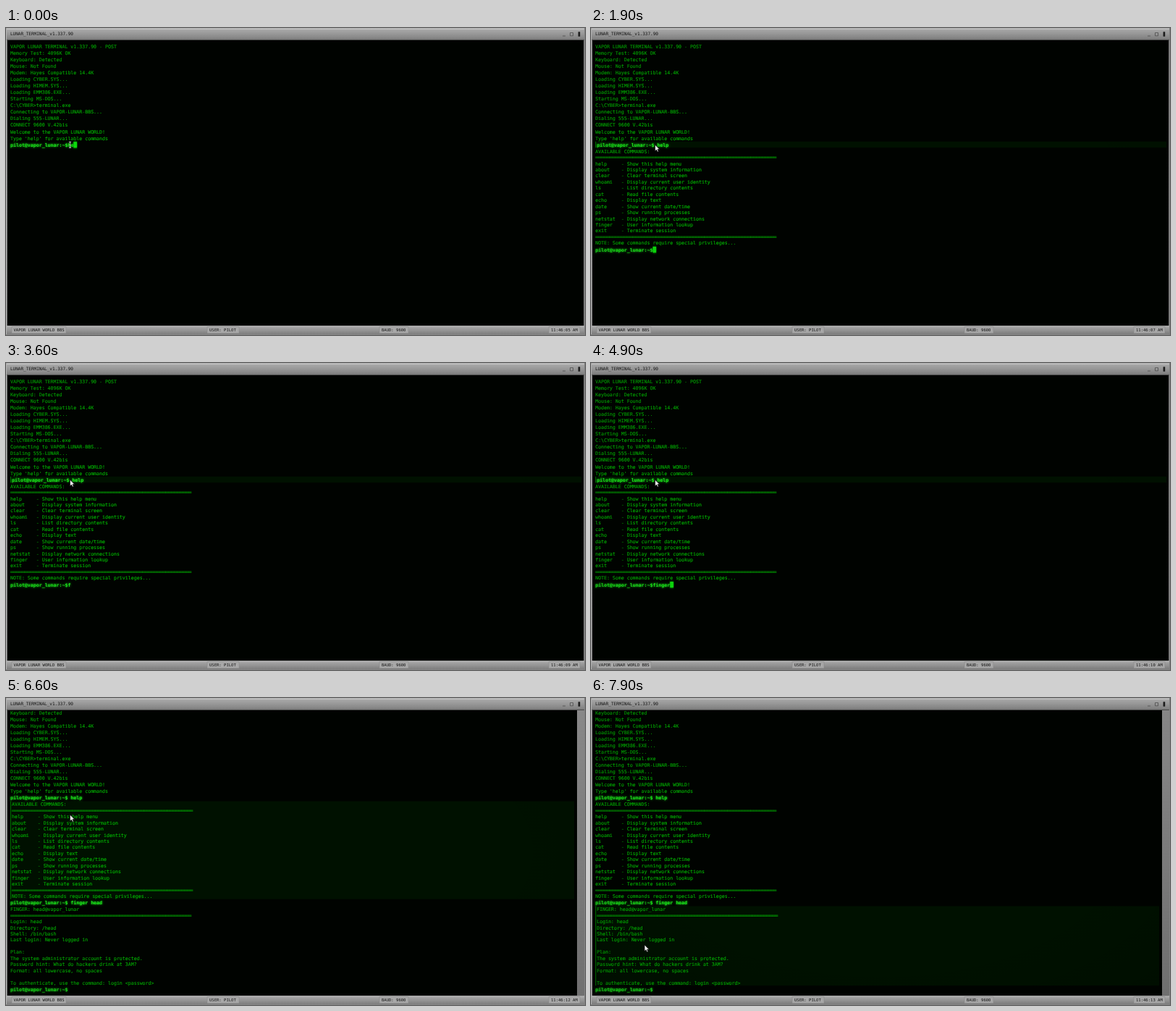
These frames come from a looping animation (800 px wide and 424 px high, 8000 ms). An HTML page:

```html
<!DOCTYPE html>
<html lang="en">
<head>
<meta charset="utf-8">
<title>Terminal</title>
<style>
  html, body { margin: 0; width: 100%; height: 100%; overflow: hidden; background: #000; }
  svg { display: block; width: 100vw; height: 100vh; }
  text { font-family: "DejaVu Sans Mono", "Liberation Mono", monospace; white-space: pre; }
  #screen text { font-size: 6.6px; fill: #00c400; stroke: #00c400; stroke-width: .12; }
  #screen text.bright { font-weight: bold; fill: #1cff1c; stroke: none; filter: url(#glow); }
  #bars text { fill: #161616; font-size: 5.55px; }
  #bars text.title { font-size: 6.03px; }
</style>
</head>
<body>
<svg id="stage" viewBox="0 0 800 424" preserveAspectRatio="none">
  <defs>
    <linearGradient id="metal" x1="0" y1="0" x2="0" y2="1">
      <stop offset="0" stop-color="#b8b8b8"/>
      <stop offset=".5" stop-color="#a0a0a0"/>
      <stop offset="1" stop-color="#868686"/>
    </linearGradient>
    <linearGradient id="thumb" x1="0" y1="0" x2="0" y2="1">
      <stop offset="0" stop-color="#929292"/>
      <stop offset="1" stop-color="#787878"/>
    </linearGradient>
    <radialGradient id="vignette" cx=".5" cy=".5" r=".72">
      <stop offset=".5" stop-color="#000" stop-opacity="0"/>
      <stop offset="1" stop-color="#000" stop-opacity=".2"/>
    </radialGradient>
    <pattern id="scan" width="4" height="2" patternUnits="userSpaceOnUse">
      <rect width="4" height="1" fill="#000" opacity=".1"/>
    </pattern>
    <filter id="glow" x="-10%" y="-80%" width="120%" height="260%">
      <feGaussianBlur stdDeviation="1.5" result="b"/>
      <feMerge><feMergeNode in="b"/><feMergeNode in="SourceGraphic"/></feMerge>
    </filter>
    <clipPath id="view"><rect x="2" y="17" width="796" height="394"/></clipPath>
  </defs>
  <rect width="800" height="424" fill="#8c8c8c"/>
  <rect x="2" y="16.5" width="796" height="395" fill="#000300"/>
  <g id="screen" clip-path="url(#view)"><g id="content"></g></g>
  <rect width="800" height="424" fill="url(#vignette)"/>
  <rect id="scrollbar" x="789" y="17" width="10" height="394" fill="url(#thumb)"/>
  <g id="bars">
    <rect x="1" y="1" width="798" height="15.5" fill="url(#metal)"/>
    <rect x="1" y="411.5" width="798" height="11.5" fill="url(#metal)"/>
    <path d="M1 1.5H799M1 412H799" stroke="#d4d4d4" stroke-width=".9"/>
    <path d="M1 16.4H799" stroke="#484848" stroke-width=".8"/>
    <path d="M.5 424V.5H800" fill="none" stroke="#c0c0c0"/>
    <path d="M799.5 0V423.5H0" fill="none" stroke="#8c8c8c"/>
  </g>
  <g id="pointer">
    <path id="arrow" d="M0 0V8.6L2 6.8L3.4 9.8L4.8 9.2L3.5 6.3H6.2Z" fill="#fff" stroke="#000" stroke-width=".5"/>
    <path id="beam" d="M-1.6 -4H1.6M0 -4V4M-1.6 4H1.6" fill="none" stroke="#ddd" stroke-width=".9"/>
  </g>
  <rect width="800" height="424" fill="url(#scan)"/>
  <rect id="flicker" width="800" height="424" fill="#000"/>
</svg>
<script>
const LOOP = 8000, LEFT = 6, ADVANCE = 3.973, PITCH = 8.45, GAP = 0.59;
const HELP_AT = 700, FINGER_AT = 6100, SCROLL = 23.3;
const PROMPT = "pilot@vapor_lunar:~$";
const RULE = "═".repeat(63);
const byId = id => document.getElementById(id);

function add(parent, tag, attrs, text) {
  const node = document.createElementNS("http://www.w3.org/2000/svg", tag);
  for (const key in attrs) node.setAttribute(key, attrs[key]);
  if (text !== undefined) node.textContent = text;
  parent.appendChild(node);
  return node;
}
const show = (node, on) => node.setAttribute("display", on ? "inline" : "none");
const move = (node, x, y) => node.setAttribute("transform", `translate(${x} ${y})`);

const boot = [
  "VAPOR LUNAR TERMINAL v1.337.90 - POST",
  "Memory Test: 4096K OK",
  "Keyboard: Detected",
  "Mouse: Not Found",
  "Modem: Hayes Compatible 14.4K",
  "Loading CYBER.SYS...",
  "Loading HIMEM.SYS...",
  "Loading EMM386.EXE...",
  "Starting MS-DOS...",
  "C:\\CYBER>terminal.exe",
  "Connecting to VAPOR-LUNAR-BBS...",
  "Dialing 555-LUNAR...",
  "CONNECT 9600 V.42bis",
  "Welcome to the VAPOR LUNAR WORLD!",
  "Type 'help' for available commands"
];
const commands = {
  help: "Show this help menu",
  about: "Display system information",
  clear: "Clear terminal screen",
  whoami: "Display current user identity",
  ls: "List directory contents",
  cat: "Read file contents",
  echo: "Display text",
  date: "Show current date/time",
  ps: "Show running processes",
  netstat: "Display network connections",
  finger: "User information lookup",
  exit: "Terminate session"
};
const helpLines = [
  "AVAILABLE COMMANDS:", RULE,
  ...Object.entries(commands).map(([name, about]) => name.padEnd(9) + "- " + about),
  RULE, "NOTE: Some commands require special privileges..."
];
const fingerLines = [
  "FINGER: head@vapor_lunar", RULE,
  "Login: head", "Directory: /head", "Shell: /bin/bash", "Last login: Never logged in", "",
  "Plan:", "The system administrator account is protected.",
  "Password hint: What do hackers drink at 3AM?",
  "Format: all lowercase, no spaces", "",
  "To authenticate, use the command: login <password>"
];

// Stack the output blocks; each highlights under the pointer.
const content = byId("content");
let nextTop = 21.2;
function addBlock(lines, from, bright) {
  const top = nextTop, height = lines.length * PITCH;
  const group = add(content, "g", {});
  const hover = add(group, "g", {});
  const fill = add(hover, "rect", { x: LEFT, y: top, height, fill: "#00ff00", opacity: .06 });
  add(hover, "rect", { x: LEFT, y: top, width: .9, height, fill: "#009000" });
  const texts = add(group, "g", {});
  lines.forEach((line, i) => add(texts, "text",
    { x: LEFT, y: top + 6.8 + i * PITCH, class: bright ? "bright" : "" }, line));
  nextTop += height + GAP;
  return { top, bottom: nextTop, from, group, hover, fill, texts };
}
const blocks = [
  ...boot.map(line => addBlock([line], 0)),
  addBlock([PROMPT + " help"], HELP_AT, true),
  addBlock(helpLines, HELP_AT),
  addBlock([PROMPT + " finger head"], FINGER_AT, true),
  addBlock(fingerLines, FINGER_AT)
];
const promptTops = [blocks[15].top, blocks[17].top, nextTop];

const input = add(content, "g", {});
const inputText = add(input, "text", { x: LEFT, y: 7.2, class: "bright" }, PROMPT);
const caret = add(input, "rect", { y: .4, width: 4.5, height: 8.2, fill: "#10f010", filter: "url(#glow)" });

// Window frame labels
const bars = byId("bars");
add(bars, "text", { x: 6, y: 10.4, class: "title" }, "LUNAR_TERMINAL_v1.337.90");
add(bars, "path", { d: "M769 11H773M779.5 6.5H783.5V10.8H779.5Z", fill: "none", stroke: "#484848", "stroke-width": .7 });
add(bars, "rect", { x: 790.6, y: 5.3, width: 2.6, height: 6.4, fill: "#1c1c1c" });
function addPanel(x, width, textX, label) {
  add(bars, "rect", { x, y: 412.8, width, height: 8.8, fill: "#b4b4b4", stroke: "#909090", "stroke-width": .5 });
  return add(bars, "text", { x: textX, y: 418.7 }, label);
}
addPanel(8, 75, 10.5, "VAPOR LUNAR WORLD BBS");
addPanel(278, 44, 281, "USER: PILOT");
addPanel(516, 40, 519, "BAUD: 9600");
const clock = addPanel(750, 43, 753, "");

const typed = (word, times, t) => word.slice(0, times.filter(at => at <= t).length);
const helpTimes = [-300, -100, 150, 300];
const fingerTimes = [3500, 3750, 3950, 4200, 4450, 4700, 5050, 5250, 5400, 5550, 5700];

function pointerAt(t) {
  const p = Math.min(1, Math.max(0, (t - 7000) / 600));
  const e = p * p * (3 - 2 * p);
  return [88.5 - 14.5 * e, 161.3 + 179.7 * e];
}

function draw(t) {
  const stage = t < HELP_AT ? 0 : t < FINGER_AT ? 1 : 2;
  const scroll = stage === 2 ? SCROLL : 0;
  const [px, py] = pointerAt(t);
  move(content, 0, -scroll);
  show(byId("scrollbar"), stage === 2);

  for (const block of blocks) {
    const y = py + scroll;
    const over = stage > 0 && y >= block.top && y < block.bottom;
    show(block.group, t >= block.from);
    show(block.hover, over);
    block.fill.setAttribute("width", stage === 2 ? 779 : 789);
    move(block.texts, over ? 2 : 0, 0);
  }

  const entry = [typed("help", helpTimes, t), typed("finger head", fingerTimes, t), ""][stage];
  inputText.textContent = PROMPT + entry;
  move(input, 0, promptTops[stage]);
  caret.setAttribute("x", LEFT + (PROMPT.length + entry.length) * ADVANCE);
  show(caret, (t + (stage === 2 ? 50 : 120)) % 1000 < 500);

  move(byId("pointer"), px, py);
  show(byId("arrow"), stage > 0);
  show(byId("beam"), stage === 0);

  const second = 5 + Math.floor((t + 500) / 1000);
  clock.textContent = `11:46:${String(second).padStart(2, "0")} AM`;
  byId("flicker").setAttribute("opacity", .015 + .015 * Math.sin(t * Math.PI / 150));
}

const start = performance.now();
function tick() {
  draw((performance.now() - start) % LOOP);
  requestAnimationFrame(tick);
}
tick();
</script>
</body>
</html>
```
